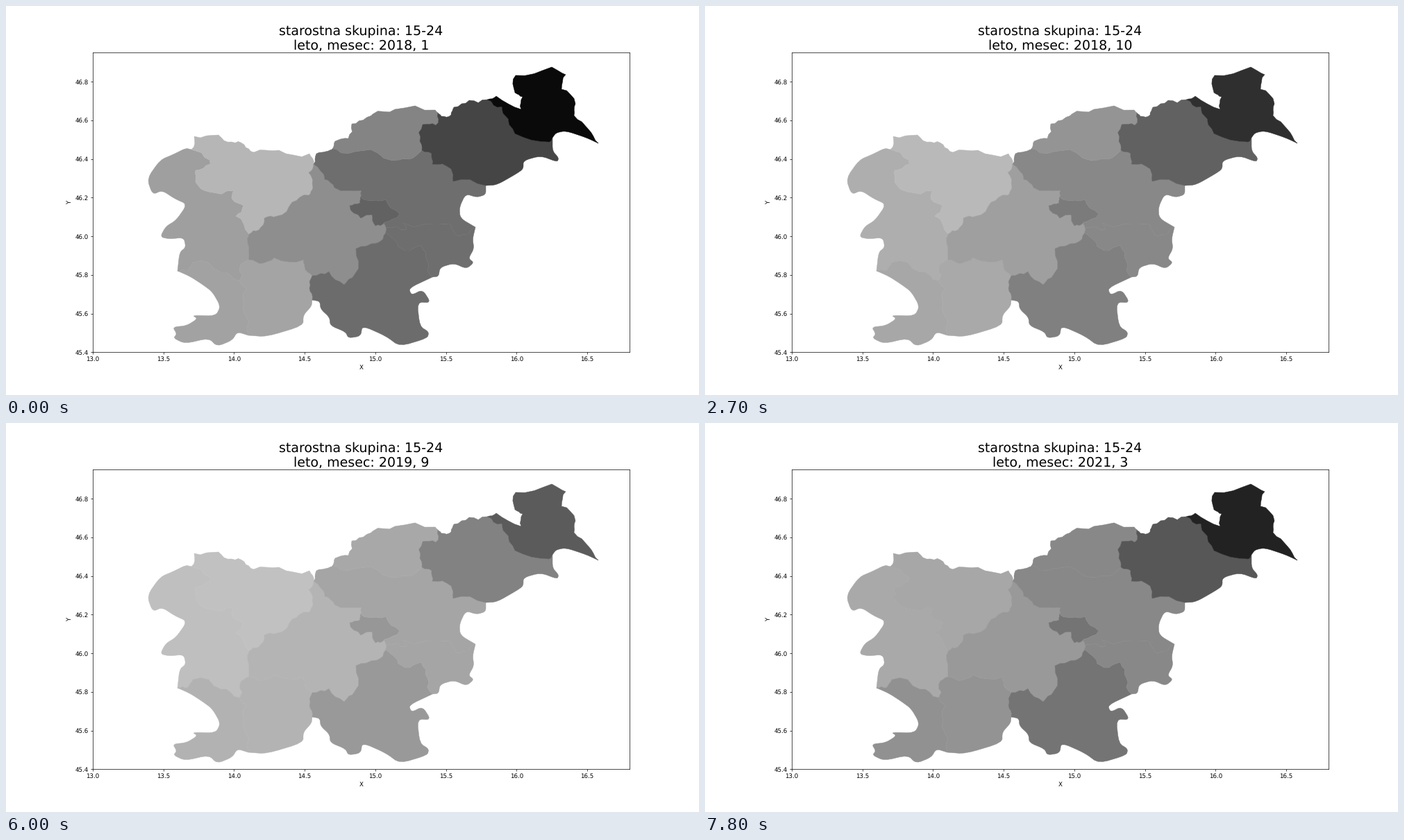
A matplotlib script that plays this animation: 998 px wide and 561 px high, repeating every 8000 ms.

```python
import numpy as np
import matplotlib.pyplot as plt
from matplotlib.animation import FuncAnimation
from matplotlib.patches import Polygon

WIDTH, HEIGHT, DPI = 998, 561, 62.375
XLIM, YLIM = (13.0, 16.8), (45.4, 46.95)
INTERVAL, FRAMES, FRAMES_PER_MONTH = 100, 80, 3
YEARS = (2018, 2019, 2021)

# Points where borders meet, in stage pixels
NODES = dict(
    A=(267, 207), B=(443, 228), C=(350, 329), D=(350, 366), E=(336, 396),
    F=(247, 382), G=(349, 475), H=(441, 389), I=(441, 424), J=(547, 327),
    K=(511, 275), L=(545, 312), M=(676, 319), N=(614, 391), O=(470, 206),
    P=(599, 208), Q=(622, 154), R=(691, 259), S=(693, 135), T=(787, 190),
    U=(547, 319), W=(495, 288), Z=(853, 198))

# Ring of nodes: darkness relative to the darkest region, first and last month
REGIONS = {
    "FACDE": (0.39, 0.39),
    "ABC": (0.30, 0.40),
    "EGF": (0.38, 0.50),
    "DHIGE": (0.37, 0.49),
    "CBKWLUJHD": (0.46, 0.46),
    "KLW": (0.64, 0.63),
    "HJNI": (0.60, 0.63),
    "JUMN": (0.59, 0.54),
    "BOPRMULK": (0.59, 0.54),
    "OQP": (0.50, 0.54),
    "QSTRP": (0.76, 0.76),
    "SZT": (1.00, 1.00),
}

# Darkness of the darkest region: falls until summer, jumps up in October
KEY_MONTHS = [0, 5, 8, 9, 12, 15, 20, 21, 26]
KEY_LEVELS = [245, 183, 178, 208, 208, 177, 164, 194, 221]
LAST_MONTH = KEY_MONTHS[-1]

rng = np.random.default_rng(4)
borders = {}


def roughen(line):
    """Kink each segment sideways at its middle."""
    step = np.diff(line, axis=0)
    normal = np.column_stack([-step[:, 1], step[:, 0]])
    kink = normal * rng.uniform(-0.17, 0.17, (len(step), 1))
    return np.insert(line, np.arange(1, len(line)),
                     line[:-1] + step / 2 + kink, axis=0)


def round_off(line):
    """Cut the corners, keeping both ends."""
    start, end = line[:-1], line[1:]
    cut = np.stack([0.8 * start + 0.2 * end, 0.2 * start + 0.8 * end], axis=1)
    return np.vstack([line[:1], cut.reshape(-1, 2), line[-1:]])


def border(ends, *via, style=roughen):
    line = np.array([NODES[ends[0]], *via, NODES[ends[1]]], float)
    line = style(style(line))
    borders[ends], borders[ends[::-1]] = line, line[::-1]


# Outer border, clockwise
border("FA", (250, 355), (259, 348), (256, 334), (235, 336), (222, 333),
       (230, 318), (245, 309), (261, 286), (243, 278), (225, 266), (211, 272),
       (203, 249), (222, 222), (241, 214), (259, 205), style=round_off)
border("AB", (271, 188), (306, 186), (325, 196), (343, 200), (357, 211),
       (393, 208), (437, 213))
border("BO", (447, 213), (464, 209))
border("OQ", (474, 195), (493, 191), (498, 170), (519, 161), (528, 156),
       (560, 149), (618, 150))
border("QS", (627, 159), (641, 157), (645, 146), (667, 136))
border("SZ", (706, 130), (742, 149), (744, 131), (733, 125), (734, 100),
       (786, 88), (806, 99), (800, 120), (820, 141), (818, 158), (839, 178))
border("ZT", (836, 190), (806, 180), (792, 183), style=round_off)
border("TR", (787, 209), (796, 219), (794, 225), (770, 216), (745, 223),
       (745, 235), (735, 242), (707, 258), style=round_off)
border("RM", (691, 272), (678, 276), (662, 271), (653, 290), (654, 306),
       style=round_off)
border("MN", (672, 336), (674, 350), (666, 364), (674, 370), (663, 379),
       (645, 371), (625, 377), (623, 390), style=round_off)
border("NI", (580, 407), (584, 417), (600, 409), (612, 428), (592, 427),
       (596, 462), (609, 470), (607, 479), (567, 491), (547, 476), (513, 461),
       (511, 476), (493, 479), (489, 470), (467, 461), (466, 449), (453, 437),
       (452, 426), style=round_off)
border("IG", (440, 433), (428, 446), (428, 461), (375, 477), style=round_off)
border("GF", (333, 470), (326, 482), (304, 491), (292, 479), (258, 487),
       (241, 479), (246, 473), (240, 463), (260, 461), (276, 451), (268, 446),
       (302, 447), (309, 433), (297, 412), (282, 401), (265, 390),
       style=round_off)

# Borders between regions
border("AC", (293, 222), (294, 228), (273, 237), (273, 254), (292, 268),
       (328, 267), (326, 279), (342, 288), (331, 303))
border("CB", (364, 323), (372, 306), (390, 303), (412, 283), (436, 273),
       (442, 262), (436, 240))
border("CD", (348, 342))
border("DE", (337, 376), (340, 390))
border("EF", (310, 384), (269, 370), (261, 382))
border("EG", (346, 408), (341, 437))
border("DH", (370, 371), (386, 363), (429, 366), (430, 376))
border("HI", (437, 407))
border("HJ", (465, 383), (487, 402), (502, 387), (504, 350), (534, 342))
border("JU")
border("UL")
border("LW", (532, 317), (527, 301), (511, 306))
border("WK", (510, 284))
border("KB", (512, 266), (473, 262), (459, 250))
border("KL", (519, 280), (547, 279), (567, 300))
border("UM", (577, 323), (570, 312), (640, 315), (652, 332))
border("JN", (559, 337), (575, 353), (598, 345), (607, 368))
border("OP", (483, 212), (525, 207), (567, 222), (580, 221))
border("QP", (619, 172), (600, 171), (596, 195))
border("PR", (613, 213), (614, 228), (641, 235), (644, 253))
border("ST", (714, 145), (718, 157), (733, 184), (782, 196))


def to_data(pixels):
    """Stage pixels to longitude and latitude on the default axes."""
    x = XLIM[0] + (pixels[:, 0] / WIDTH - 0.125) / 0.775 * np.ptp(XLIM)
    y = YLIM[1] - (pixels[:, 1] / HEIGHT - 0.12) / 0.77 * np.ptp(YLIM)
    return np.column_stack([x, y])


def outline(ring):
    return np.vstack([borders[a + b] for a, b in zip(ring, ring[1:] + ring[0])])


plt.rcParams.update({"font.family": "DejaVu Sans", "text.hinting": "none"})
fig, ax = plt.subplots(figsize=(WIDTH / DPI, HEIGHT / DPI), dpi=DPI)
fig.subplots_adjust(left=0.125, right=0.9, bottom=0.11, top=0.88)
ax.set(xlim=XLIM, ylim=YLIM, xlabel="X", ylabel="Y")
title = ax.set_title("", fontsize=22, pad=5)
patches = [ax.add_patch(Polygon(to_data(outline(ring)), lw=0.5))
           for ring in REGIONS]


def update(frame):
    month = frame // FRAMES_PER_MONTH
    title.set_text("starostna skupina: 15-24\n"
                   f"leto, mesec: {YEARS[month // 12]}, {month % 12 + 1}")
    level = np.interp(month, KEY_MONTHS, KEY_LEVELS)
    for patch, (first, last) in zip(patches, REGIONS.values()):
        share = first + (last - first) * month / LAST_MONTH
        patch.set_color(str(1 - level * share / 255))
    return [title, *patches]


anim = FuncAnimation(fig, update, frames=FRAMES, interval=INTERVAL,
                     init_func=lambda: update(0), repeat=True, repeat_delay=0)
plt.show()
```
